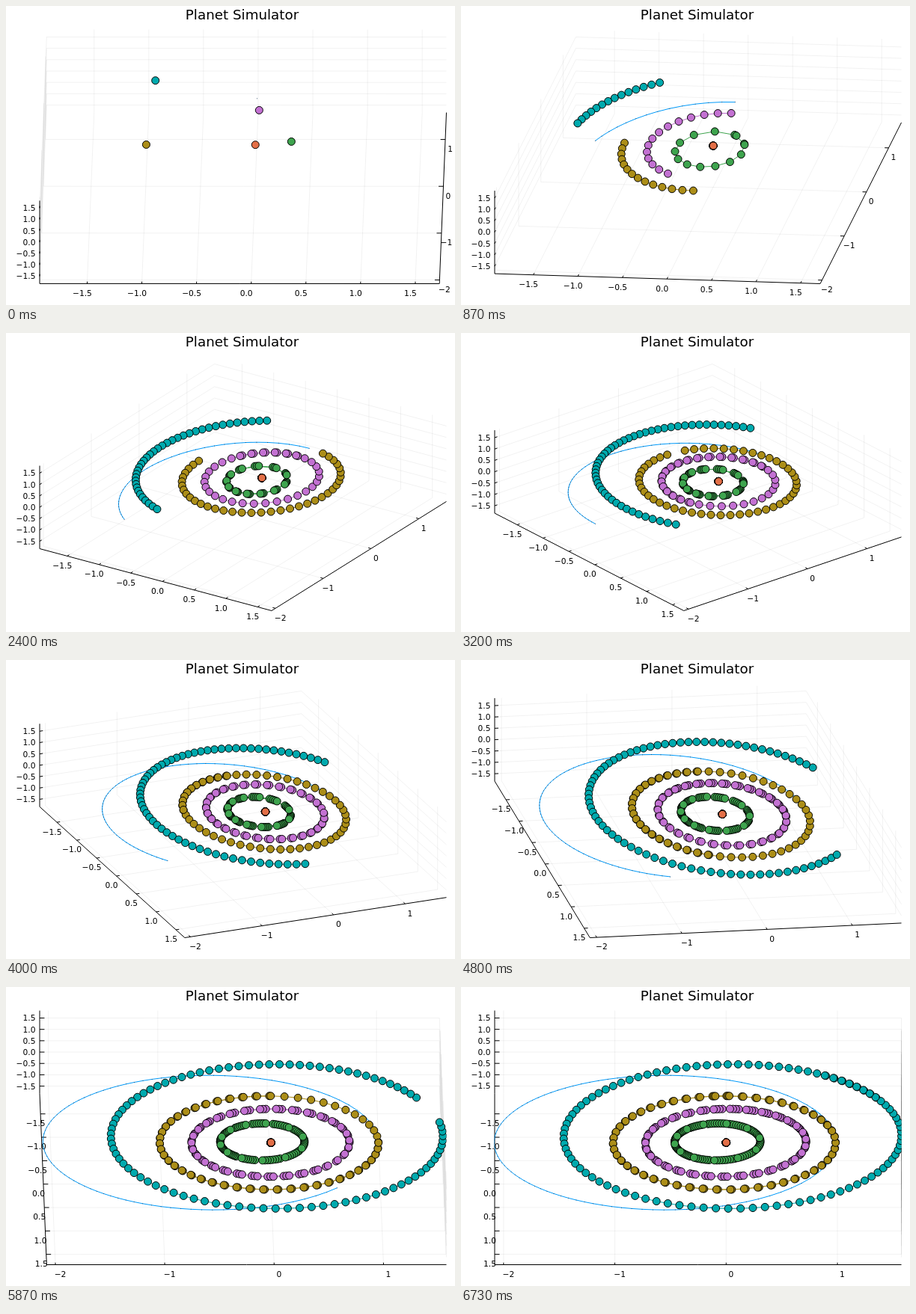
Animation, 600 px wide and 400 px high, one loop 6790 ms. Source, as an HTML page with a canvas:

```html
<!DOCTYPE html>
<html lang="en">
<head>
<meta charset="utf-8">
<title>Planet Simulator</title>
<style>
  html, body { margin: 0; width: 100%; height: 100%; overflow: hidden; background: #fff; }
  canvas { display: block; }
</style>
</head>
<body>
<canvas id="stage" width="600" height="400"></canvas>
<script>
const ctx = document.getElementById('stage').getContext('2d');
const LOOP = 6790, FRAMES = 102, RAD = Math.PI / 180;
const LEFT = 45, RIGHT = 588.5, TOP = 31, BOTTOM = 371.5;
const DEPTH = 229, HEIGHT = 111;               // pixels of floor depth and of the z axis
const SPAN = 3.655, MIN = { x: -1.934, y: -2.08, z: -SPAN / 2 };
const TICK = 0.012;

// Orbital elements: size, period in steps, eccentricity, perihelion, node, inclination,
// first mean anomaly (angles in degrees)
const bodies = [
  { color: '#009afa', a: 1.537, period: 95.6, e: 0.356, peri: 90, node: 0, inc: 0, m0: 0, tiny: true },
  { color: '#e36f47', a: 0.002, period: 12, e: 0, peri: 0, node: 0, inc: 0, m0: 0 },
  { color: '#3ea44e', a: 0.3871, period: 12.11, e: 0.2056, peri: 77.46, node: 48.33, inc: 7, m0: -44.3 },
  { color: '#c371d2', a: 0.7233, period: 30.82, e: 0.0068, peri: 131.6, node: 0, inc: 3.39, m0: -43 },
  { color: '#ac8e18', a: 1, period: 50.1, e: 0.0167, peri: 102.94, node: 0, inc: 0, m0: 75 },
  { color: '#00aaae', a: 1.5237, period: 93.9, e: 0.0934, peri: 336.06, node: 49.56, inc: 1.85, m0: 142.8 },
];

function position({ a, period, e, peri, node, inc, m0 }, step) {
  const M = (m0 + 360 * step / period) * RAD;
  let E = M;
  for (let k = 0; k < 12; k++) E -= (E - e * Math.sin(E) - M) / (1 - e * Math.cos(E));
  const [px, py] = turn(a * (Math.cos(E) - e), a * Math.sqrt(1 - e * e) * Math.sin(E), peri - node);
  const [x, y] = turn(px, py * Math.cos(inc * RAD), node);
  return [x, y, py * Math.sin(inc * RAD)];
}

function turn(x, y, deg) {
  const c = Math.cos(deg * RAD), s = Math.sin(deg * RAD);
  return [x * c - y * s, x * s + y * c];
}

for (const b of bodies) b.path = Array.from({ length: FRAMES }, (_, n) => position(b, n));

const unit = (axis, v) => (v - MIN[axis]) / SPAN;

// Maps the unit cube to the stage for a camera azimuth
function camera(deg) {
  const c = Math.cos(deg * RAD), s = Math.sin(deg * RAD);
  return (x, y, z) => [
    LEFT + (RIGHT - LEFT) * (x * c + y * s) / (c + s),
    BOTTOM - DEPTH * ((1 - x) * s * s + y * c * c) - HEIGHT * z,
  ];
}

function line(points, color, width) {
  ctx.beginPath();
  for (const p of points) ctx.lineTo(...p);
  ctx.strokeStyle = color;
  ctx.lineWidth = width;
  ctx.stroke();
}

function text(str, x, y, size, align) {
  ctx.font = size + 'px "DejaVu Sans", sans-serif';
  ctx.textAlign = align;
  ctx.fillStyle = '#000';
  ctx.fillText(str, x, y);
}

const format = (v, digits) => v.toFixed(digits).replace('-', '\u2212');
const halves = [-1.5, -1, -0.5, 0, 0.5, 1, 1.5], wholes = [-2, -1, 0, 1];

function drawAxes(at) {
  const grid = (...pts) => line(pts.map(p => at(...p)), 'rgba(0,0,0,0.09)', 0.65);
  const black = (...pts) => line(pts.map(p => at(...p)), '#000', 1);

  for (const v of halves) {
    const x = unit('x', v), z = unit('z', v);
    grid([x, 0, 0], [x, 1, 0], [x, 1, 1]);
    grid([0, 0, z], [0, 1, z], [1, 1, z]);
  }
  for (const v of wholes) {
    const y = unit('y', v);
    grid([1, y, 0], [0, y, 0], [0, y, 1]);
  }

  black([0, 0, 1], [0, 0, 0], [1, 0, 0], [1, 1, 0]);
  for (const v of halves) {
    const x = unit('x', v), z = unit('z', v), label = format(v, 1);
    black([x, 0, 0], [x, TICK, 0]);
    black([0, 0, z], [0, TICK, z]);
    const [lx, ly] = at(x, 0, 0);
    text(label, lx - 6.5, ly + 16.4, 10.67, 'center');
    text(label, 39.5, at(0, 0, z)[1] + 3.9, 10.67, 'right');
  }
  for (const v of wholes) {
    const y = unit('y', v);
    black([1, y, 0], [1 - TICK, y, 0]);
    const [lx, ly] = at(1, y, 0);
    text(format(v, 0), lx + 6.5, ly + 16.4, 10.67, 'center');
  }
}

function drawBody({ path, color, tiny }, at, n) {
  const pts = path.slice(0, n + 1)
    .map(([x, y, z]) => at(unit('x', x), unit('y', y), unit('z', z)));
  line(pts, color, 1);
  for (const [x, y] of pts) {
    ctx.beginPath();
    ctx.arc(x, y, tiny ? 0.5 : 5, 0, 2 * Math.PI);
    ctx.fillStyle = tiny ? '#135' : color;
    ctx.fill();
    if (tiny) continue;
    ctx.strokeStyle = '#000';
    ctx.lineWidth = 1;
    ctx.stroke();
  }
}

function draw(n) {
  const at = camera(Math.min(90, n + 1));
  ctx.fillStyle = '#fff';
  ctx.fillRect(0, 0, 600, 400);
  text('Planet Simulator', 315.5, 18, 18.3, 'center');
  drawAxes(at);
  ctx.save();
  ctx.beginPath();
  ctx.rect(LEFT - 0.5, TOP, RIGHT - LEFT + 0.5, BOTTOM - TOP);
  ctx.clip();
  for (const b of bodies) drawBody(b, at, n);
  ctx.restore();
}

// 15 steps a second, each starting on a multiple of 10 ms
function stepAt(t) {
  const n = Math.round(t * 0.015);
  return Math.round(n / 0.15) * 10 > t ? n - 1 : n;
}

function tick() {
  draw(stepAt(performance.now() % LOOP));
  requestAnimationFrame(tick);
}
tick();
</script>
</body>
</html>
```
